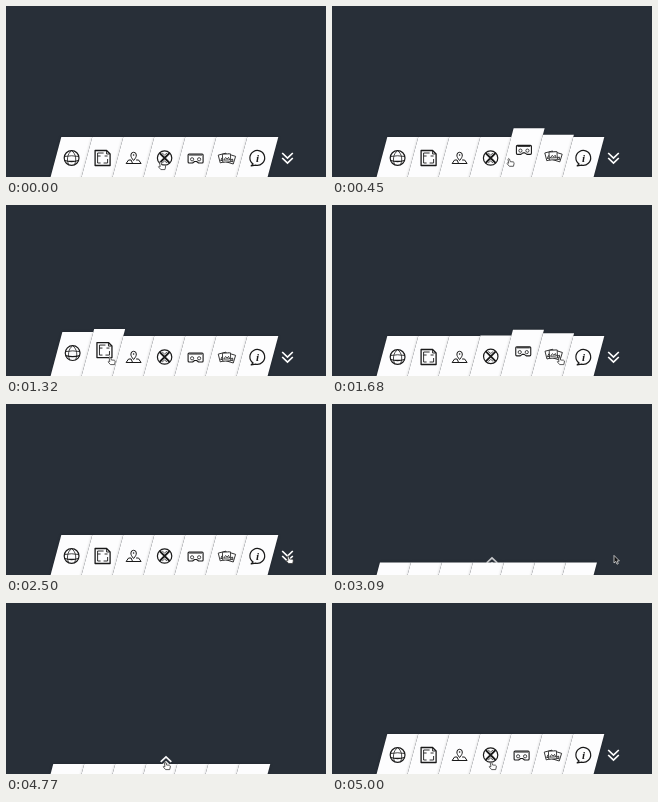
Recreate the animation shown at these times as an HTML page with a canvas. Size 320 by 171 pixels, loop 5190 ms.

```html
<!DOCTYPE html>
<html lang="en">
<head>
<meta charset="utf-8">
<title>Slanted tab menu</title>
<style>
html, body { margin: 0; width: 100%; height: 100%; overflow: hidden; background: #282f38; }
canvas { display: block; width: 100vw; height: 100vh; }
</style>
</head>
<body>
<canvas id="stage"></canvas>
<script>
const LOOP = 5190, W = 320, H = 171;
const SLANT = 0.268, TAB = 31, LEFT = 55.3, TOP = 131, LIFT = 11, DROP = 35;
const HOVER_TIME = 200, MENU_CLICK = 2820;
const canvas = document.getElementById('stage');
const ratio = window.devicePixelRatio || 1;
canvas.width = W * ratio;
canvas.height = H * ratio;
const ctx = canvas.getContext('2d');

// Turning points of the pointer tip: [time, x, y]
const route = [
  [0, 154, 156], [280, 225, 153], [840, 67, 152], [1090, 60, 152], [1180, 60, 152],
  [1640, 203, 152], [1680, 227, 152], [2200, 266, 152], [2500, 282, 152],
  [3500, 282, 151], [3910, 149, 156], [4090, 149, 156], [4320, 159, 159], [LOOP, 159, 159]
];

const clamp = v => Math.min(1, Math.max(0, v));

function bezier(x1, y1, x2, y2) {
  const at = (u, a, b) => 3 * u * (1 - u) ** 2 * a + 3 * u * u * (1 - u) * b + u ** 3;
  return x => {
    if (x <= 0 || x >= 1) return clamp(x);
    let lo = 0, hi = 1;
    for (let i = 0; i < 16; i++) {
      const mid = (lo + hi) / 2;
      if (at(mid, x1, x2) < x) lo = mid; else hi = mid;
    }
    return at(lo, y1, y2);
  };
}
const ease = bezier(0.25, 0.1, 0.25, 1);
const easeInOut = bezier(0.42, 0, 0.58, 1);

function pointerAt(t) {
  const i = route.findIndex(stop => stop[0] > t);
  const [t0, x0, y0] = route[i - 1], [t1, x1, y1] = route[i];
  const k = (t - t0) / (t1 - t0);
  return [x0 + (x1 - x0) * k, y0 + (y1 - y0) * k];
}

// Walk the route once to learn when the pointer is over each tab.
const visits = [];
for (let t = 30; t < MENU_CLICK; t += 2) {
  const [x, y] = pointerAt(t);
  const tab = Math.floor((x + SLANT * (y - TOP) - LEFT) / TAB);
  const last = visits[visits.length - 1];
  if (last && last.tab === tab) last.leave = t;
  else visits.push({ tab, enter: t, leave: t });
}

function liftOf(tab, t) {
  let lift = 0;
  for (const visit of visits) {
    if (visit.tab !== tab) continue;
    const peak = ease((Math.min(t, visit.leave) - visit.enter) / HOVER_TIME);
    lift = Math.max(lift, peak * (1 - ease((t - visit.leave) / HOVER_TIME)));
  }
  return lift * LIFT;
}

function stroke(path, width = 1) {
  ctx.lineWidth = width;
  ctx.stroke(new Path2D(path));
}

function circle(x, y, r, filled) {
  ctx.beginPath();
  ctx.arc(x, y, r, 0, 7);
  filled ? ctx.fill() : ctx.stroke();
}

function card(x, y, angle) {
  ctx.save();
  ctx.translate(x, y);
  ctx.rotate(angle);
  ctx.fillStyle = '#fff';
  ctx.fillRect(-4, -4, 8, 8);
  ctx.strokeRect(-4, -4, 8, 8);
  stroke('M-3 2L-1 -.5L.5 1L2 -.5L3 2Z', 0.8);
  ctx.restore();
}

// Each icon is drawn around its own centre.
const icons = [
  function globe() {
    ctx.lineWidth = 1.2;
    circle(0, 0, 7.4);
    stroke('M0 -7.4C-4.5 -4 -5 2 -3 6.5M0 -7.4C4.5 -4 5 2 3 6.5M-7 -1.5Q0 -3 7 -1.5', 0.8);
    stroke('M-7 2.5Q0 4.5 7 2.5', 1.3);
  },
  function floorPlan() {
    stroke('M-7.5 -7.5H4L7.5 -4V7.5H-7.5Z', 1.3);
    stroke('M4 -7V-4H7M-5 -5H1M-5 -5V5H-2M1 5H5V1M-2 -2H-5M2 -2H5', 0.9);
  },
  function mapPin() {
    stroke('M0 2.5C-2 0 -2.7 -1 -2.7 -3A2.7 2.7 0 0 1 2.7 -3C2.7 -1 2 0 0 2.5Z');
    circle(0, -3, 0.8, true);
    stroke('M-2.5 2H-5L-7.5 5.5H7.5L5 2H2.5M-2.5 2L-1 5.5', 1);
  },
  function compass() {
    ctx.lineWidth = 1.2;
    circle(0, 0, 7.2);
    stroke('M-5 -5L5 5M-5 5L5 -5', 1.8);
    stroke('M-2.5 -5L0 -3L2.5 -5M-2.5 5L0 3L2.5 5', 0.7);
  },
  function goggles() {
    stroke('M-6.5 -4H6.5Q7.5 -4 7.5 -3V4Q7.5 5 6.5 5H3L1 3.5H-1L-3 5H-6.5Q-7.5 5 -7.5 4V-3Q-7.5 -4 -6.5 -4Z', 1.1);
    stroke('M-6.5 -3H6.5', 1);
    ctx.lineWidth = 0.8;
    circle(-3.5, 1.3, 1.6);
    circle(3.5, 1.3, 1.6);
  },
  function photos() {
    ctx.lineWidth = 0.8;
    card(-3.5, 0, -0.25);
    card(4, 1, 0.3);
    card(0, 0, -0.05);
  },
  function info() {
    stroke('M-4.5 6A7.4 7.4 0 1 1 -2 7.1L-6.5 8Z', 1.2);
    ctx.font = 'italic bold 11px "Liberation Serif", serif';
    ctx.textAlign = 'center';
    ctx.fillText('i', 0, 3.8);
  }
];

function drawTab(index, t, drop) {
  const offset = drop - liftOf(index, t);
  ctx.save();
  ctx.translate(LEFT + index * TAB - SLANT * offset, TOP + offset);

  ctx.save();
  ctx.transform(1, 0, -SLANT, 1, 0, 0);
  ctx.shadowColor = 'rgba(0,0,0,.22)';
  ctx.shadowBlur = 3 * ratio;
  ctx.fillStyle = '#fdfdfe';
  ctx.fillRect(0, 0, TAB, 70);
  ctx.restore();

  ctx.translate(TAB / 2 - 5.2, 21);
  ctx.strokeStyle = ctx.fillStyle = '#1a1a1a';
  ctx.lineJoin = 'round';
  icons[index]();
  ctx.restore();
}

function chevrons(x, y, direction, alpha) {
  ctx.save();
  ctx.globalAlpha = alpha;
  ctx.translate(x, y);
  ctx.scale(1, direction);
  ctx.strokeStyle = '#fff';
  stroke('M-5.3 -5L0 0L5.3 -5M-5.3 0L0 5L5.3 0', 1.7);
  ctx.restore();
}

const hand = new Path2D('M-.8 .5Q0 -.8 .8 .5L1.5 3L4.5 3.2Q5.6 3.6 5.3 5L4.7 7.6H.6L-1.8 4.8Q-1.5 3.8 0 4.5Z');
const arrow = new Path2D('M0 0V7.6L1.8 6L3 8.8L4.3 8.2L3.1 5.5H5.4Z');

function drawPointer(t) {
  const isArrow = t > MENU_CLICK + 40 && t < 4200;
  const shape = isArrow ? arrow : hand;
  ctx.save();
  ctx.translate(...pointerAt(t));
  ctx.lineJoin = 'round';
  ctx.lineWidth = 0.8;
  ctx.fillStyle = isArrow ? '#111' : '#fff';
  ctx.strokeStyle = isArrow ? '#ddd' : '#333';
  ctx.fill(shape);
  ctx.stroke(shape);
  ctx.restore();
}

function draw(t) {
  ctx.setTransform(ratio, 0, 0, ratio, 0, 0);
  ctx.fillStyle = '#282f38';
  ctx.fillRect(0, 0, W, H);

  const closed = easeInOut((t - MENU_CLICK) / 400) - easeInOut((t - 4690) / 310);
  chevrons(160, 158.8, -1, clamp(closed * 3 - 1.6));
  for (let i = 0; i < icons.length; i++) drawTab(i, t, closed * DROP);
  chevrons(281.5, 152, 1, clamp(1 - closed * 2));
  drawPointer(t);
}

function frame() {
  draw(performance.now() % LOOP);
  requestAnimationFrame(frame);
}
frame();
</script>
</body>
</html>
```
